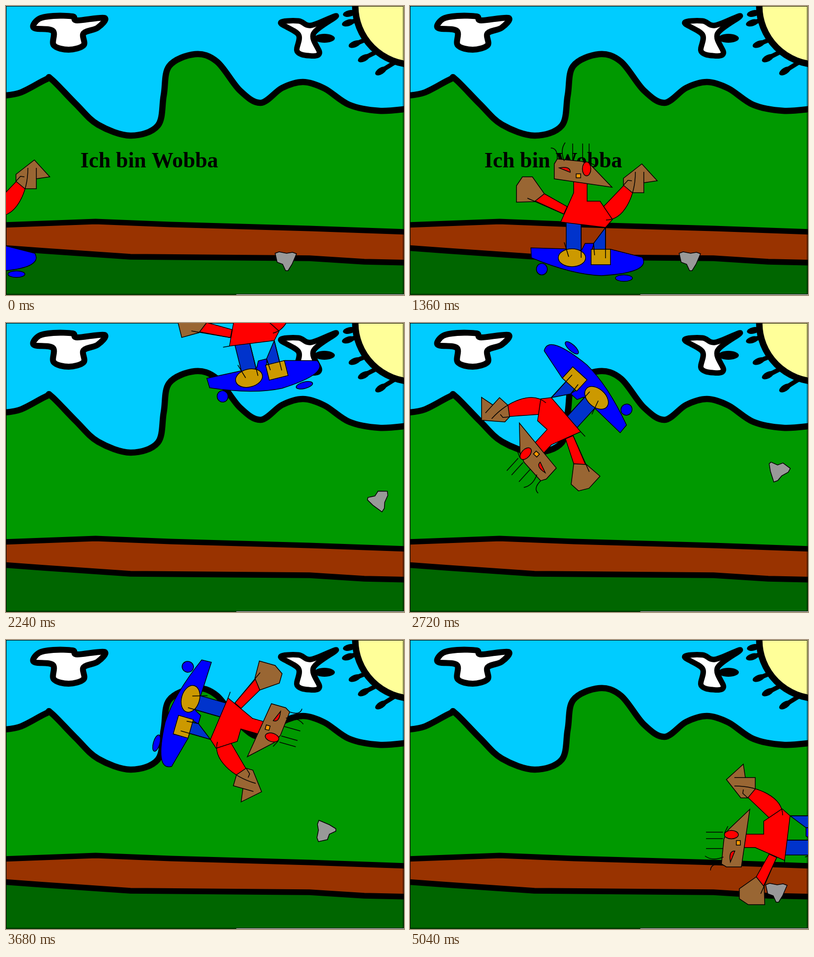
An HTML page with a canvas for the animation above (5.28 s loop, 800 px wide and 582 px high).

```html
<!DOCTYPE html>
<html lang="de">
<head>
<meta charset="utf-8">
<style>
html, body { margin: 0; width: 100%; height: 100%; overflow: hidden; }
canvas { display: block; }
</style>
</head>
<body>
<canvas id="stage" width="800" height="582"></canvas>
<script>
const ctx = document.getElementById('stage').getContext('2d');
const STEP = 80, LAST = 63, LOOP = 5280, TEXT_END = 20, RIDE_END = 17;
const BROWN = '#996633', RED = '#ff0000', BLUE = '#0000ff', JEANS = '#0033cc', GOLD = '#cc9900';
const RAD = Math.PI / 180;

// Key moments: step, x, y, degrees
const heroKeys = [
  [0, -84, 499, 0], [RIDE_END, 325, 507, 0], [21, 419, 486, 0], [28, 488, 111, -14],
  [33, 345, 150, -117], [39, 527, 156, -241], [42, 612, 72, -247], [46, 371, 118, -254],
  [49, 381, 318, -286], [56, 556, 475, -361], [LAST, 825, 422, -450]
];
const stoneKeys = [
  [21, 562, 512, 0], [28, 748, 356, 103], [32, 768, 358, 127],
  [39, 668, 141, 170], [46, 642, 385, 270], [50, 736, 507, 360]
];

function poseAt(keys, step) {
  const i = keys.findIndex(key => key[0] > step);
  if (i === 0) return keys[0].slice(1);
  if (i < 0) return keys[keys.length - 1].slice(1);
  const a = keys[i - 1], b = keys[i], u = (step - a[0]) / (b[0] - a[0]);
  return a.slice(1).map((v, n) => v + (b[n + 1] - v) * u);
}

function heroPose(step) {
  const [x, y, degrees] = poseAt(heroKeys, step);
  const bob = step < RIDE_END ? 4 * Math.sin(2 * Math.PI * step / RIDE_END) : 0;
  return [x, y + bob, degrees];
}

function paint(fill, width = 1.5) {
  if (fill) { ctx.fillStyle = fill; ctx.fill(); }
  if (width) { ctx.lineWidth = width; ctx.strokeStyle = '#000'; ctx.stroke(); }
}

function trace(p) {
  ctx.beginPath();
  for (let i = 0; i < p.length; i += 2) ctx.lineTo(p[i], p[i + 1]);
}

function poly(p, fill, width) {
  trace(p);
  ctx.closePath();
  paint(fill, width);
}

function line(p, width) {
  trace(p);
  paint(null, width);
}

function oval(x, y, rx, ry, fill, width, turn = 0) {
  ctx.beginPath();
  ctx.ellipse(x, y, rx, ry, turn, 0, Math.PI * 2);
  paint(fill, width);
}

function curve(x, y, ...bezier) {
  ctx.beginPath();
  ctx.moveTo(x, y);
  if (bezier.length === 4) ctx.quadraticCurveTo(...bezier);
  else ctx.bezierCurveTo(...bezier);
}

// Catmull-Rom curve through the points
function smooth(p, closed) {
  const n = p.length / 2;
  const at = i => {
    const k = closed ? (i + n) % n : Math.max(0, Math.min(n - 1, i));
    return [p[2 * k], p[2 * k + 1]];
  };
  ctx.beginPath();
  ctx.moveTo(p[0], p[1]);
  for (let i = 0; i < (closed ? n : n - 1); i++) {
    const [a, b, c, d] = [at(i - 1), at(i), at(i + 1), at(i + 2)];
    ctx.bezierCurveTo(b[0] + (c[0] - a[0]) / 6, b[1] + (c[1] - a[1]) / 6,
      c[0] - (d[0] - b[0]) / 6, c[1] - (d[1] - b[1]) / 6, c[0], c[1]);
  }
  if (closed) ctx.closePath();
}

// Fills everything below a line, then inks the line itself
function land(edge, fill, width, build) {
  build(edge);
  ctx.lineTo(808, 590);
  ctx.lineTo(-8, 590);
  paint(fill, 0);
  build(edge);
  paint(null, width);
}

function drawLand() {
  land([-8, 181, 30, 174, 80, 148, 92, 148, 140, 197, 185, 239, 250, 261, 305, 241, 317, 180,
    328, 121, 380, 97, 424, 112, 470, 170, 512, 195, 555, 165, 597, 153, 640, 166,
    690, 199, 750, 211, 808, 207], '#009900', 12.5, smooth);
  land([-8, 441, 180, 434, 330, 440, 610, 448, 808, 455], '#993300', 11, trace);
  land([-8, 487, 75, 493, 250, 505, 610, 508, 720, 515, 808, 517], '#006600', 11.5, trace);
}

function drawSun() {
  [174, 166, 145, 129, 108].forEach((angle, i) => {
    const x = 820 + 118 * Math.cos(angle * RAD), y = 118 * Math.sin(angle * RAD);
    const lean = (168 - 5 * i) * RAD, length = 16 + 7 * i;
    const dx = Math.cos(lean) * length, dy = Math.sin(lean) * length;
    line([x, y, x + dx, y + dy], 9);
    oval(x + dx * .8, y + dy * .8, 13, 6.5, '#000', 0, lean);
  });
  oval(820, 0, 118, 118, '#ffff99', 13);
}

function drawBirds() {
  smooth([56, 44, 66, 26, 95, 20, 134, 21, 143, 29, 198, 24, 184, 44, 156, 55, 156, 79,
    126, 88, 96, 79, 94, 50], true);
  paint('#fff', 12);
  oval(640, 65, 21, 9, '#000', 0);
  smooth([552, 34, 588, 30, 613, 39, 664, 20, 618, 56, 630, 95, 608, 100, 585, 91, 588, 58], true);
  paint('#fff', 11);
}

function drawStone() {
  poly([-21, -14, -17, 4, -6, 8, 0, 21, 5, 21, 13, 8, 22, -13, 14, -16, 2, -14, -13, -17], '#999999');
}

function drawBoard() {
  trace([467, 506, 404, 490, 366, 490, 370, 478, 352, 478, 346, 490, 243, 487, 244, 507]);
  ctx.quadraticCurveTo(325, 541, 385, 543);
  ctx.quadraticCurveTo(485, 537, 467, 506);
  paint(BLUE);
  oval(265, 530, 11, 11.5, BLUE);
  oval(430, 548, 17, 6.5, BLUE);
}

function drawLegs() {
  poly([314, 436, 344, 438, 344, 492, 314, 492], JEANS);
  poly([393, 446, 393, 492, 370, 492, 369, 478], JEANS);
  oval(325.5, 507, 27.5, 18, GOLD);
  poly([364, 490, 403, 490, 403, 521, 364, 521], GOLD);
  line([344, 440, 344, 507]);
  line([310, 476, 319, 505]);
  line([369, 478, 371, 502]);
  line([393, 447, 393, 508]);
}

function drawBody() {
  trace([406, 430, 388, 405, 430, 361, 447, 376]);
  ctx.quadraticCurveTo(436, 418, 406, 430);
  paint(RED, 0);
  line([388, 405, 430, 361]);
  poly([270, 378, 316, 404, 309, 419, 250, 392], RED);
  poly([329, 350, 356, 354, 356, 393, 382, 393, 407, 430, 393, 446, 303, 435, 329, 376], RED);
  line([290, 434, 303, 435]);
}

function drawHands() {
  poly([226, 344, 246, 344, 270, 378, 250, 394, 214, 395, 214, 362], BROWN);
  line([236, 387, 309, 419]);
  poly([466, 318, 497, 352, 470, 356, 470, 376, 447, 376, 429, 361, 429, 347], BROWN);
  line([470, 334, 470, 356]);
  line([446, 352, 438, 351, 429, 361]);
  curve(453, 334, 453, 383, 430, 431, 394, 431);
  paint();
}

function drawHead() {
  poly([296, 308, 346, 313, 364, 321, 406, 365, 290, 348, 290, 318], BROWN);
  line([358, 314, 372, 321]);
  oval(355, 328, 8.5, 14, RED);
  curve(300, 326, 323, 322, 322, 335);
  ctx.closePath();
  paint(RED);
  poly([334, 338, 343, 338, 343, 346, 334, 346], '#ff9900');
  for (const x of [327, 347, 360]) line([x, 277, x, 311]);
  curve(312, 275, 301, 290, 310, 312);
  paint();
  curve(283, 286, 297, 286, 296, 308);
  paint();
}

function drawHero() {
  ctx.translate(-325, -507);
  drawBoard();
  drawLegs();
  drawBody();
  drawHands();
  drawHead();
}

function place([x, y, degrees], draw) {
  ctx.save();
  ctx.translate(x, y);
  ctx.rotate(degrees * RAD);
  draw();
  ctx.restore();
}

function drawFrame() {
  ctx.lineWidth = 1;
  ctx.strokeStyle = '#000';
  ctx.strokeRect(.5, .5, 798, 580);
  ctx.fillStyle = '#fff';
  ctx.fillRect(463, 581, 337, 1);
}

function render(now) {
  const step = Math.min(LAST, Math.floor(now % LOOP / STEP));
  ctx.fillStyle = '#00ccff';
  ctx.fillRect(0, 0, 800, 582);
  drawLand();
  drawSun();
  drawBirds();
  drawFrame();
  if (step < TEXT_END) {
    ctx.fillStyle = '#000';
    ctx.font = 'bold 43.7px "Liberation Serif", serif';
    ctx.fillText('Ich bin Wobba', 149.5, 325);
  }
  place(poseAt(stoneKeys, step), drawStone);
  place(heroPose(step), drawHero);
}

const start = performance.now();
function tick() {
  render(performance.now() - start);
  requestAnimationFrame(tick);
}
tick();
</script>
</body>
</html>
```
